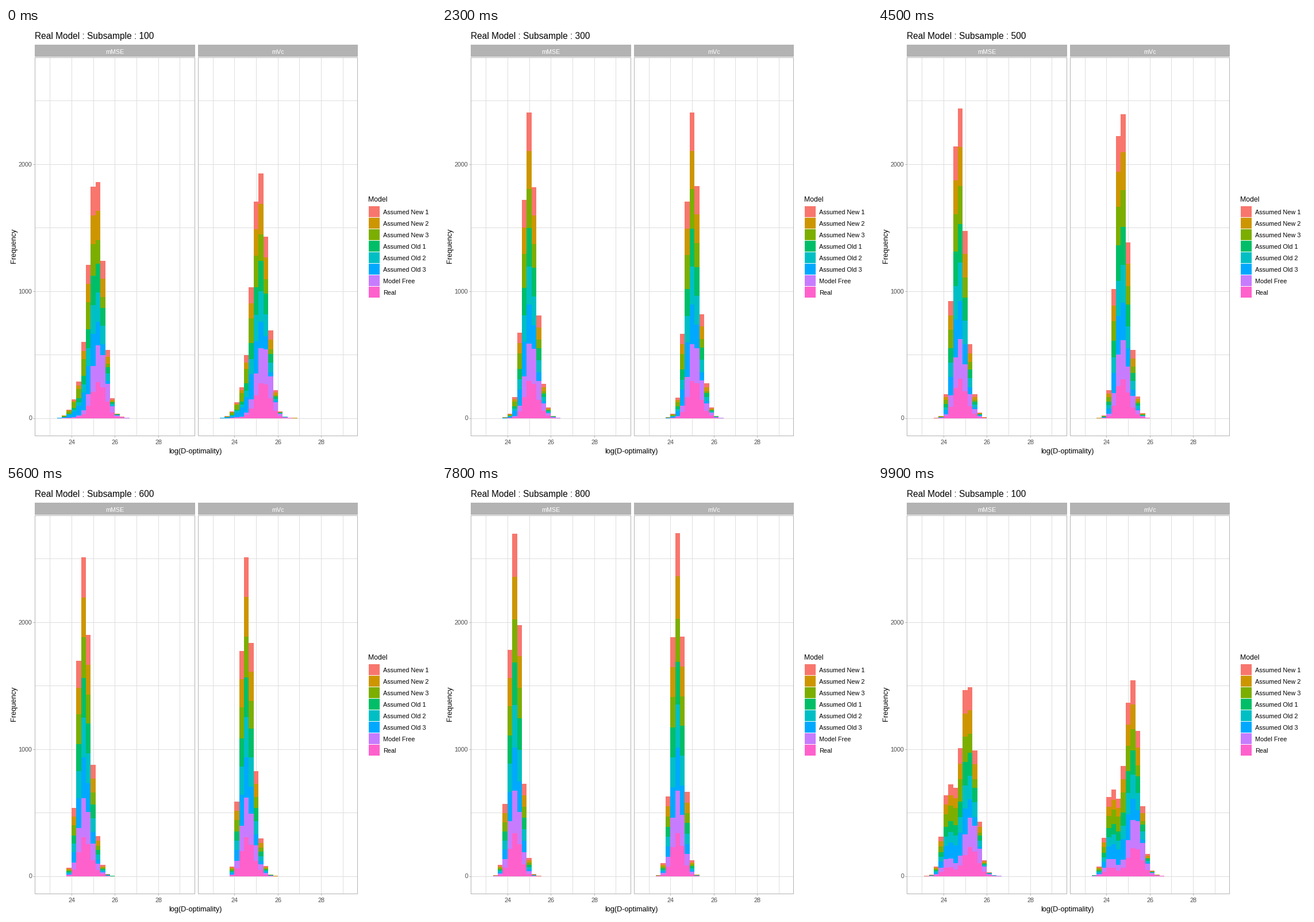
Animation of 748x748 px, one loop 10 s. Source, as a matplotlib script:

```python
import matplotlib.pyplot as plt
import numpy as np
from matplotlib.animation import FuncAnimation
from matplotlib.collections import PolyCollection
from matplotlib.patches import Rectangle

SIZE, DPI, FRAMES = 748, 100, 100
plt.rcParams["font.family"] = "Liberation Sans"

# Color, and how strongly the model leans to higher bins
MODELS = {
    "Assumed New 1": ("#F8766D", -.03), "Assumed New 2": ("#CD9600", 0),
    "Assumed New 3": ("#7CAE00", -.31), "Assumed Old 1": ("#00BE67", -.03),
    "Assumed Old 2": ("#00BFC4", 0), "Assumed Old 3": ("#00A9FF", -.33),
    "Model Free": ("#C77CFF", .33), "Real": ("#FF61CC", .30),
}
COLORS = [color for color, _ in MODELS.values()]
TILT = np.array([tilt for _, tilt in MODELS.values()])

# Left edge, right edge and x of value 24 for each panel
PANELS = {"mMSE": (50.5, 328.5, 114.4), "mVc": (334.5, 611.5, 397.9)}
TOP, BOTTOM = 50.5, 708.5
BINS, BIN_W, BIN_SHIFT, UNIT = 19, 8.41, -51.1, 37.65
ZERO, PX_PER_COUNT = 679, 0.2211

# Moments of the histograms, in bins, at a few subsample sizes
STATES, TOTAL = 9, 8000
KEYS = [0, 2, 4, 5, 7, 8]
MEANS = {"mMSE": [10.31, 10.12, 8.85, 8.26, 7.09, 6.43],
         "mVc": [10.56, 10.13, 8.77, 8.20, 7.02, 6.41]}
SPREAD = [1.81, 1.41, 1.325, 1.32, 1.19, 1.147]
SKEW = [-.39, .15, .30, .36, .04, 0]


def stack(state, panel):
    """Upper level of each model (rows) in each bin, stacked from the last."""
    mean, sd, skew = (np.interp(state, KEYS, values)
                      for values in (MEANS[panel], SPREAD, SKEW))
    lean = (1 - state / (STATES - 1)) ** 1.3
    offset = np.arange(BINS) - mean
    z = offset / sd
    # Normal curve corrected for skewness and kurtosis (Gram-Charlier)
    curve = np.exp(-z**2 / 2) * (1 + skew / 6 * (z**3 - 3 * z)
                                 + .7 * lean / 24 * (z**4 - 6 * z**2 + 3))
    curve = np.maximum(curve, 0)
    share = np.exp(lean * TILT[:, None] * np.clip(offset, -4, 4))
    share *= TOTAL * curve / curve.sum() / share.sum(axis=0)
    return share[::-1].cumsum(axis=0)[::-1]


# levels[state, model, panel, bin], closed into a loop
levels = np.array([[stack(s, p) for p in PANELS]
                   for s in range(STATES)]).swapaxes(1, 2)
levels = np.concatenate([levels, levels[:1]])

# Rests of 6 or 7 frames, linear transitions of 5 or 6 between them
LENGTHS = np.where(np.arange(STATES) < 2, 6, 5)
STARTS = 5 + 6 * np.arange(STATES) + np.append(0, LENGTHS[:-1].cumsum())
KNOTS = np.column_stack([STARTS, STARTS + LENGTHS]).ravel()
PHASES = np.repeat(np.arange(STATES + 1), 2)[1:-1]

fig = plt.figure(figsize=(SIZE / DPI, SIZE / DPI), dpi=DPI, facecolor="white")
ax = fig.add_axes([0, 0, 1, 1])
ax.set(xlim=(0, SIZE), ylim=(SIZE, 0))
ax.axis("off")


def text(x, y, s, px, color="black", ha="left", **kw):
    return ax.text(x, y, s, fontsize=px * 72 / DPI, color=color, ha=ha,
                   va="baseline", **kw)


def line(xs, ys, color, z=1):
    ax.plot(xs, ys, color=color, lw=72 / DPI, zorder=z,
            solid_capstyle="butt")


def box(x, y, w, h, color):
    ax.add_patch(Rectangle((x, y), w, h, fc=color, lw=0, antialiased=False))


def center(v):
    """Middle of the pixel that holds v."""
    return np.floor(v) + 0.5


def count_y(count):
    return center(ZERO - .5 - count * PX_PER_COUNT)


GRID, EDGE, TICK_TEXT = "#DEDEDE", "#B3B3B3", "#4D4D4D"
for name, (left, right, x24) in PANELS.items():
    mid = (left + right) / 2
    box(left - .5, 29, right - left + 1, 21, EDGE)
    text(mid, 45, name, 10.8, "white", "center")
    for value in range(23, 30):
        x = center(x24 + (value - 24) * UNIT)
        line([x, x], [TOP, BOTTOM], GRID)
        if value in (24, 26, 28):
            line([x, x], [BOTTOM, BOTTOM + 3.5], EDGE)
            text(x, 724, str(value), 10.8, TICK_TEXT, "center")
    for count in range(0, 2501, 500):
        line([left, right], [count_y(count)] * 2, GRID)
    line([left, right, right, left, left],
         [TOP, TOP, BOTTOM, BOTTOM, TOP], EDGE, 4)

for count in (0, 1000, 2000):
    y = count_y(count)
    line([47, 50.5], [y, y], EDGE)
    text(45.3, y + 4, str(count), 10.8, TICK_TEXT, "right")

title = text(50, 19, "", 15.5)
text(329, 740, "log(D-optimality)", 12.6, ha="center")
text(17, 379, "Frequency", 12.7, ha="center", rotation=90,
     rotation_mode="anchor")

text(630, 302, "Model", 12.3)
for i, (name, color) in enumerate(zip(MODELS, COLORS)):
    y = round(310 + 20.05 * i)
    box(631, y, 19, 19, color)
    text(656, y + 14, name, 10.85)

# Bars overlap down to the baseline, later models in front
edges = np.array([np.round(x24 + BIN_SHIFT + BIN_W * np.arange(BINS + 1))
                  for _, _, x24 in PANELS.values()])
verts = np.empty((len(MODELS), len(PANELS), BINS, 4, 2))
verts[..., 0:2, 0] = edges[:, :-1, None]
verts[..., 2:4, 0] = edges[:, 1:, None]
verts[..., 1] = ZERO
bars = PolyCollection(verts.reshape(-1, 4, 2), linewidths=0, zorder=3,
                      antialiaseds=False, edgecolors="none",
                      facecolors=np.repeat(COLORS, len(PANELS) * BINS))
ax.add_collection(bars, autolim=False)


def update(frame):
    phase = np.interp(frame, KNOTS, PHASES)
    state = min(int(phase), STATES - 1)
    mix = phase - state
    level = (1 - mix) * levels[state] + mix * levels[state + 1]
    verts[..., 1:3, 1] = (ZERO - np.round(level * PX_PER_COUNT + .3))[..., None]
    bars.set_verts(verts.reshape(-1, 4, 2))
    size = 100 * (int(phase + .5) % STATES + 1)
    title.set_text(f"Real Model : Subsample : {size}")
    return bars, title


anim = FuncAnimation(fig, update, frames=FRAMES, interval=100, repeat=True,
                     repeat_delay=0)
plt.show()
```
